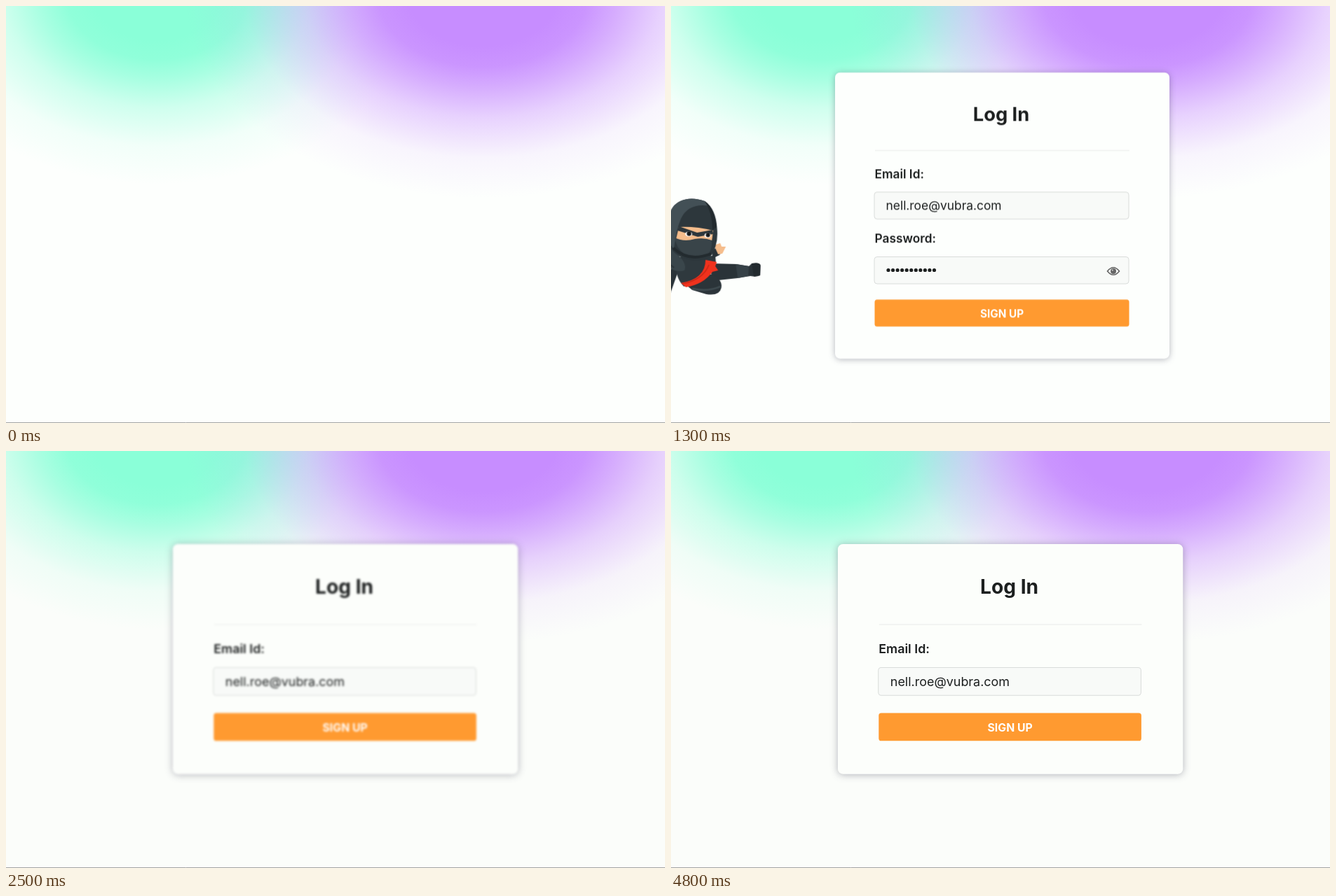
Write an HTML page that moves like this. It is 940 px wide and 596 px high and loops after 4.9 s.

```html
<!DOCTYPE html>
<html lang="en">
<head>
<meta charset="utf-8">
<title>Log in form</title>
<style>
  html, body { margin: 0; width: 100%; height: 100%; overflow: hidden; background: #fdfffd; }
  svg { display: block; width: 940px; height: 596px; }
  text { font-family: Inter, Roboto, sans-serif; fill: #1c1f1f; }
  .title { font-size: 27.3px; font-weight: 700; text-anchor: middle; }
  .label { font-size: 17.3px; font-weight: 600; }
  .value { font-size: 17.4px; }
  .action { font-size: 15.3px; font-weight: 700; text-anchor: middle; fill: #fff; }
  .field { fill: #f8faf8; stroke: #d9dcda; }
  .card { fill: #fdfffd; filter: drop-shadow(0 1px 5px rgba(50, 50, 75, .36)); }
  .second .card { fill: #fcfefb; }

  .base, .form, .first, .second, .drop, .password, .nx, .ny {
    animation: 4900ms linear infinite;
  }
  .base { animation-name: tint; }
  .form { animation-name: blur; }
  .first { animation-name: leave; }
  .second { animation-name: arrive; }
  .drop { animation-name: drop; }
  .password { animation-name: kicked; transform-origin: 471.5px 377.5px; }
  .nx { animation-name: fly; }
  .ny { animation-name: arc; }

  @keyframes tint {
    0%, 46.94% { fill: #fdfffd; }
    48.98%, 100% { fill: #fbfdfa; }
  }
  @keyframes drop {
    0%, 2.04% { transform: translateY(-525px); animation-timing-function: cubic-bezier(.3, .3, .5, 1); }
    8.16% { transform: translateY(14px); animation-timing-function: ease-in-out; }
    10.2% { transform: translateY(-3px); animation-timing-function: ease-in-out; }
    12.24%, 100% { transform: none; }
  }
  @keyframes blur {
    0%, 41.84% { filter: none; }
    41.85% { filter: blur(0); }
    44.9% { filter: blur(1.5px); }
    47.96% { filter: blur(3px); }
    54.08% { filter: blur(0); }
    54.09%, 100% { filter: none; }
  }
  @keyframes leave {
    0%, 46.94% { opacity: 1; }
    48.98%, 100% { opacity: 0; }
  }
  @keyframes arrive {
    0%, 46.94% { opacity: 0; }
    48.98%, 100% { opacity: 1; }
  }
  @keyframes kicked {
    0%, 30% { transform: none; }
    36.735% { transform: translate(646px, 81px) rotate(6deg); }
    38.78%, 100% { transform: translate(842px, 115px) rotate(8deg); }
  }
  @keyframes fly {
    0%, 22.449% { transform: translateX(-676px); }
    44.898%, 100% { transform: translateX(387px); }
  }
  /* The two curves are the halves of one parabola. */
  @keyframes arc {
    0%, 22.449% { transform: translateY(-27px); animation-timing-function: cubic-bezier(.333, .667, .667, 1); }
    28.857% { transform: translateY(-80px); animation-timing-function: cubic-bezier(.333, 0, .667, .333); }
    44.898%, 100% { transform: translateY(252px); }
  }
</style>
</head>
<body>
<svg viewBox="0 0 940 596">
  <defs>
    <radialGradient id="mint">
      <stop offset=".25" stop-color="#8affd8"/>
      <stop offset=".35" stop-color="#8affd8" stop-opacity=".95"/>
      <stop offset=".45" stop-color="#8affd8" stop-opacity=".75"/>
      <stop offset=".6" stop-color="#8affd8" stop-opacity=".4"/>
      <stop offset=".8" stop-color="#8affd8" stop-opacity=".1"/>
      <stop offset="1" stop-color="#8affd8" stop-opacity="0"/>
    </radialGradient>
    <radialGradient id="violet">
      <stop offset=".25" stop-color="#c78dff"/>
      <stop offset=".35" stop-color="#c78dff" stop-opacity=".93"/>
      <stop offset=".45" stop-color="#c78dff" stop-opacity=".73"/>
      <stop offset=".6" stop-color="#c78dff" stop-opacity=".4"/>
      <stop offset=".8" stop-color="#c78dff" stop-opacity=".09"/>
      <stop offset="1" stop-color="#c78dff" stop-opacity="0"/>
    </radialGradient>

    <g id="top">
      <text class="title" x="471" y="164">Log In</text>
      <path d="M291 206.5H654" stroke="#eaecea"/>
      <text class="label" x="290.5" y="246">Email Id:</text>
      <rect class="field" x="290" y="266" width="363" height="38.5" rx="4"/>
      <text class="value" x="306.5" y="291.5">nell.roe@vubra.com</text>
    </g>
    <g id="button">
      <rect x="290.5" y="419.5" width="363" height="38.5" rx="3.5" fill="#ff9a30"/>
      <text class="action" x="472" y="445">SIGN UP</text>
    </g>
  </defs>

  <rect class="base" width="940" height="596"/>
  <ellipse cx="215" cy="-20" rx="370" ry="275" fill="url(#mint)"/>
  <ellipse cx="680" cy="-15" rx="425" ry="290" fill="url(#violet)"/>

  <g class="form">
    <g class="first">
      <g class="drop">
        <rect class="card" x="234" y="95" width="477" height="409" rx="7"/>
        <use href="#top"/>
        <text class="label" x="290.5" y="338.5">Password:</text>
        <use href="#button"/>
        <g class="password">
          <rect class="field" x="290" y="358.5" width="363" height="38.5" rx="4"/>
          <path d="M310 377.5H376" stroke="#1c1f1f" stroke-width="5.2" stroke-linecap="round" stroke-dasharray="0 6.55"/>
          <path d="M622.5 379Q631 368.500 639.500 379Q631 389.500 622.500 379Z" fill="none" stroke="#666" stroke-width="1.6"/>
          <circle cx="631" cy="379" r="4" fill="#666"/>
          <circle cx="629.8" cy="377.600" r="1.1" fill="#ccc"/>
        </g>
      </g>
    </g>
    <g class="second">
      <g transform="translate(-3.5 35) scale(1.032)">
        <rect class="card" x="234" y="95" width="477" height="318.500" rx="7"/>
        <use href="#top"/>
        <use href="#button" y="-90.5"/>
      </g>
    </g>
  </g>

  <g class="nx"><g class="ny">
    <!-- sword -->
    <path d="M487 450L474 487" stroke="#2b3439" stroke-width="11" stroke-linecap="round"/>
    <path d="M446 408L458 418" stroke="#252c30" stroke-width="8" stroke-linecap="round"/>
    <path d="M449 413L454 417" stroke="#e8301c" stroke-width="6"/>
    <!-- kicking leg -->
    <path d="M538 441L575 442L593 445L597 441Q609 439 609.500 444L609 458Q604 461 595 459L577 462L540 466Z" fill="#2a3338"/>
    <path d="M574 442L593 445L592 459L577 462Z" fill="#364147"/>
    <path d="M597 441Q609 439 609.500 444L609 458L600 460Z" fill="#232b2f"/>
    <!-- bent leg -->
    <path d="M499 468L537 456Q556 463 553.500 476Q551 488 532 485L512 479Z" fill="#2b3439"/>
    <path d="M512 477Q535 482 552 474" fill="none" stroke="#3d494e" stroke-width="3"/>
    <!-- torso and belt -->
    <path d="M489 432L545 430L546 442L528 464L500 474Q486 460 489 432Z" fill="#2f393e"/>
    <path d="M531 436L547 439L545 445L549 451L541 453Q528 471 503 475L496 469Q531 463 531 436Z" fill="#f0321d"/>
    <path d="M498 470Q527 465 536 443" fill="none" stroke="#c92716" stroke-width="1.5"/>
    <!-- far arm -->
    <path d="M540 424L549 415Q557 420 551 429L541 434Z" fill="#2a3338"/>
    <path d="M543 415L552 412L554 417L560 417L555 427L549 428Z" fill="#f5bd8c"/>
    <!-- near arm -->
    <path d="M452 405Q454 396 464 396L473 401L462 415L454 417Z" fill="#f5bd8c"/>
    <path d="M456 404Q465 396 474 406Q478 418 493 430Q505 442 501 451Q490 455 478 446Q457 429 456 404Z" fill="#3a464b"/>
    <path d="M461 413Q466 432 486 447" fill="none" stroke="#2b3439" stroke-width="2"/>
    <!-- hood -->
    <path d="M477 404Q474 361 495 352Q510 345 530 352Q546 363 547.500 391Q550 416 537 433Q520 442 496 432Q479 424 477 404Z" fill="#2d373c"/>
    <path d="M477 404Q474 361 495 352Q510 345 530 352L537 359Q507 354 496 377Q489 393 486 420Q479 414 477 404Z" fill="#435056"/>
    <path d="M530 352Q543 361 547 389L541 393Q541 369 530 352Z" fill="#222a2e"/>
    <!-- face -->
    <path d="M493 389Q518 388 542 394L540 409L513 415L489 406Z" fill="#f5bd8c"/>
    <path d="M493 388L519 397L541 393L542 399L520 403L491 394Z" fill="#2d373c"/>
    <ellipse cx="507" cy="399" rx="5" ry="3.500" fill="#fff"/>
    <ellipse cx="534" cy="401" rx="4.500" ry="3.300" fill="#fff"/>
    <circle cx="507.500" cy="398.500" r="3.200" fill="#161a1c"/>
    <circle cx="534.500" cy="400.500" r="3" fill="#161a1c"/>
    <path d="M487 404Q500 411 516 406Q530 404 540 408Q541 423 533 430Q518 437 501 428Q489 419 487 404Z" fill="#394449"/>
    <path d="M485 419Q507 440 539 427" fill="none" stroke="#232b2f" stroke-width="4"/>
  </g></g>

  <path d="M0 595.500H940" stroke="#a3a3a3"/>
</svg>
</body>
</html>
```
